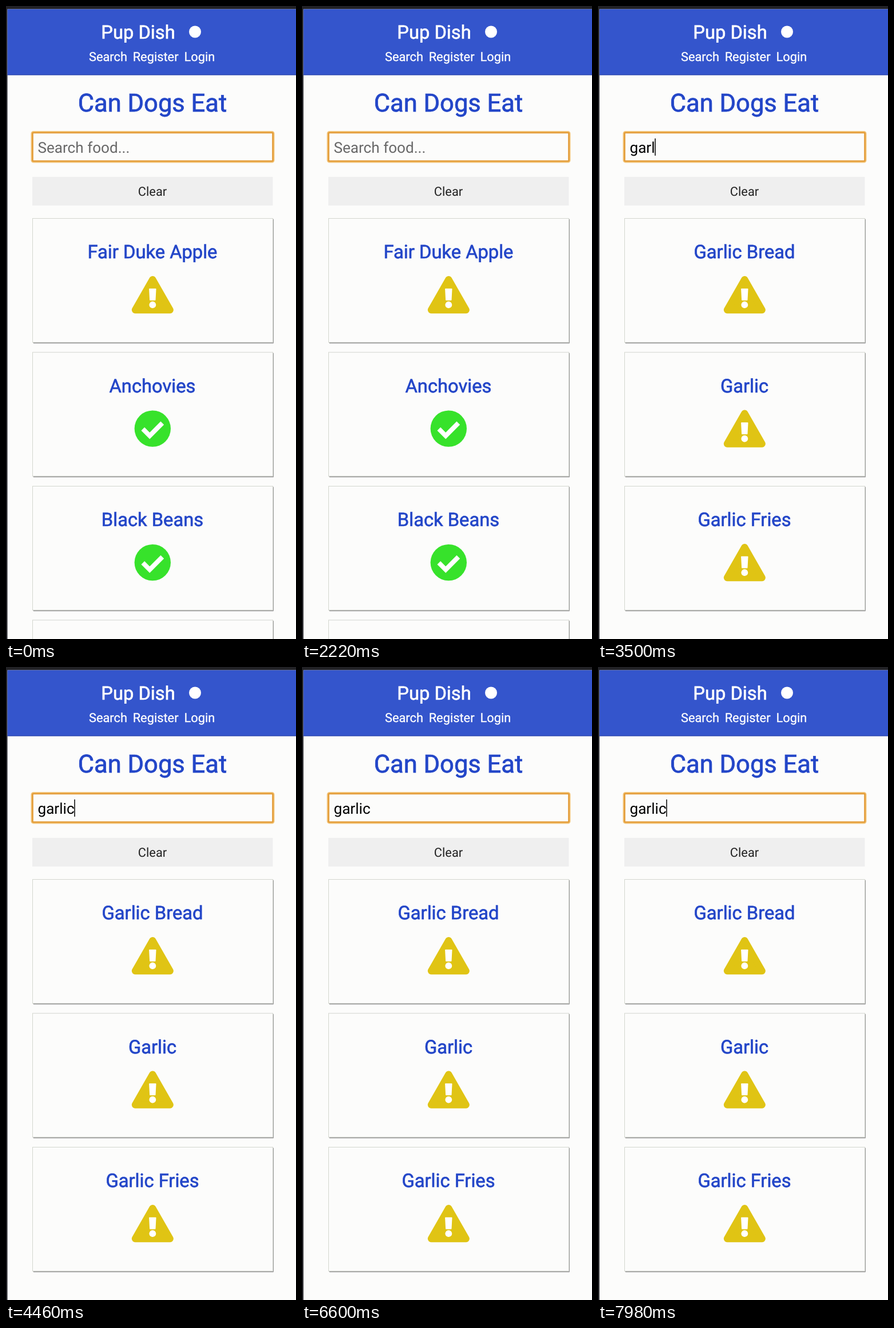
An HTML page for the animation above (8 s loop, 507 by 1104 pixels).

```html
<!DOCTYPE html>
<html lang="en">
<head>
<meta charset="utf-8">
<title>Food search</title>
<style>
  html, body { margin: 0; width: 100%; height: 100%; overflow: hidden; background: #fcfcfb; }
  svg { display: block; width: 507px; height: 1104px; font: 21.8px Roboto, sans-serif; text-rendering: geometricPrecision; }
  .mid { text-anchor: middle; }
  .head { font-size: 32.7px; stroke-width: .7; }
  .blue { fill: #2346c8; stroke: #2346c8; }
  .white { fill: #fff; stroke: #fff; }
  .nav { stroke-width: .3; }
  .field { font-size: 26.1px; }
</style>
</head>
<body>
<svg viewBox="0 0 507 1104">
  <defs>
    <g id="warn">
      <path d="M0-26.5L30.4 26.5H-30.4Z" fill="#e0c414" stroke="#e0c414" stroke-width="12.2" stroke-linejoin="round"/>
      <path d="M-5.4-10H5.4L4.4 9H-4.4Z" fill="#fff" stroke="#fff" stroke-width="1.6" stroke-linejoin="round"/>
      <circle cy="17.6" r="5.9" fill="#fff"/>
    </g>
    <g id="ok">
      <circle r="31.7" fill="#37e22b"/>
      <path d="M-17 .5L-5.1 12.4L17-9.7" fill="none" stroke="#fff" stroke-width="8.1"/>
    </g>
    <g id="toxic" fill="#c81a1a">
      <ellipse cy="-16.5" rx="18.4" ry="16.1"/>
      <rect x="-10" y="-9" width="20" height="13.5" rx="3"/>
      <path d="M-26 5L26 28.3M26 5L-26 28.3" stroke="#c81a1a" stroke-width="8"/>
      <circle cx="-7" cy="-15" r="4.1" fill="#fff"/>
      <circle cx="7" cy="-15" r="4.1" fill="#fff"/>
    </g>
    <g id="box">
      <rect x="47.5" y="1.5" width="420.5" height="217" rx="1" fill="#999"/>
      <rect x="46.5" y=".5" width="420" height="216" fill="#fcfcfb" stroke="#d3d6cf"/>
    </g>
  </defs>

  <path d="M0 0H507V5.5H2.5V1104H0Z" fill="#222226"/>
  <rect x="2.5" y="5.5" width="504.5" height="115" fill="#3455cc"/>
  <rect x="2.5" y="119.5" width="504.5" height="1" fill="#2a45a8"/>
  <text class="head white mid" x="231" y="57">Pup Dish</text>
  <circle cx="330.5" cy="45" r="10.5" fill="#fff"/>
  <g class="nav white">
    <text x="145" y="96">Search</text>
    <text x="221.7" y="96">Register</text>
    <text x="311.6" y="96">Login</text>
  </g>
  <text class="blue mid" x="256" y="183.5" font-size="43.5" stroke-width=".8">Can Dogs Eat</text>

  <rect x="46" y="220.5" width="421" height="50.5" rx="2" fill="#fcfcfb" stroke="#f3c67c" stroke-width="5"/>
  <rect x="46.5" y="221" width="420" height="49.5" rx="1" fill="#fcfcfb" stroke="#e39c38" stroke-width="2.6"/>
  <text id="query" class="field" x="55.5" y="255.5"></text>
  <rect id="caret" y="231" width="1.5" height="30"/>

  <rect x="46" y="298" width="420.5" height="50" fill="#efefef"/>
  <text class="mid" x="256" y="330.5" fill="#222">Clear</text>
  <g id="cards"></g>
</svg>
<script>
const LOOP = 8000, BLINK = 500, STEP = 233.5;
const query = document.getElementById("query");
const caret = document.getElementById("caret");
const cards = document.getElementById("cards");

// Each food is [name, icon]; lists with more than three show the next card's edge.
const start = [["Fair Duke Apple", "warn"], ["Anchovies", "ok"], ["Black Beans", "ok"], []];
const vinegar = ["Balsamic Vinegar", "toxic"], gum = ["Sugar Free Gum", "toxic"];
const garlic = ["Garlic Bread", "Garlic", "Garlic Fries"].map(name => [name, "warn"]);
const gala = [["Royal Gala Apple", "warn"], vinegar, gum, []];

// Keystrokes: time, typed text, results
const keys = [
  [0, "", start],
  [2500, "g", gala],
  [2620, "ga", gala],
  [3060, "gar", [vinegar, gum, garlic[0], []]],
  [3420, "garl", garlic],
  [3700, "garli", garlic],
  [3970, "garlic", garlic]
];

function card([name, icon], i) {
  const y = 370 + i * STEP;
  const content = name ? `<text class="head blue mid" x="256" y="70">${name}</text>
    <use href="#${icon}" x="256.3" y="133.6"/>` : "";
  return `<g transform="translate(0 ${y})"><use href="#box"/>${content}</g>`;
}

let shown;
function draw(now) {
  const t = now % LOOP;
  const key = keys.findLast(k => k[0] <= t);
  const [since, text, foods] = key;
  if (key !== shown) {
    query.textContent = text || "Search food...";
    query.setAttribute("fill", text ? "#000" : "#686868");
    caret.setAttribute("x", 55.2 + (text ? query.getComputedTextLength() : 0));
    cards.innerHTML = foods.map(card).join("");
    shown = key;
  }
  // The empty field starts in the hidden half of the blink.
  const phase = Math.floor((t - since) / BLINK) + (text ? 0 : 1);
  caret.setAttribute("visibility", phase % 2 ? "hidden" : "visible");
}

const origin = performance.now();
function tick() {
  draw(performance.now() - origin);
  requestAnimationFrame(tick);
}
tick();
</script>
</body>
</html>
```
